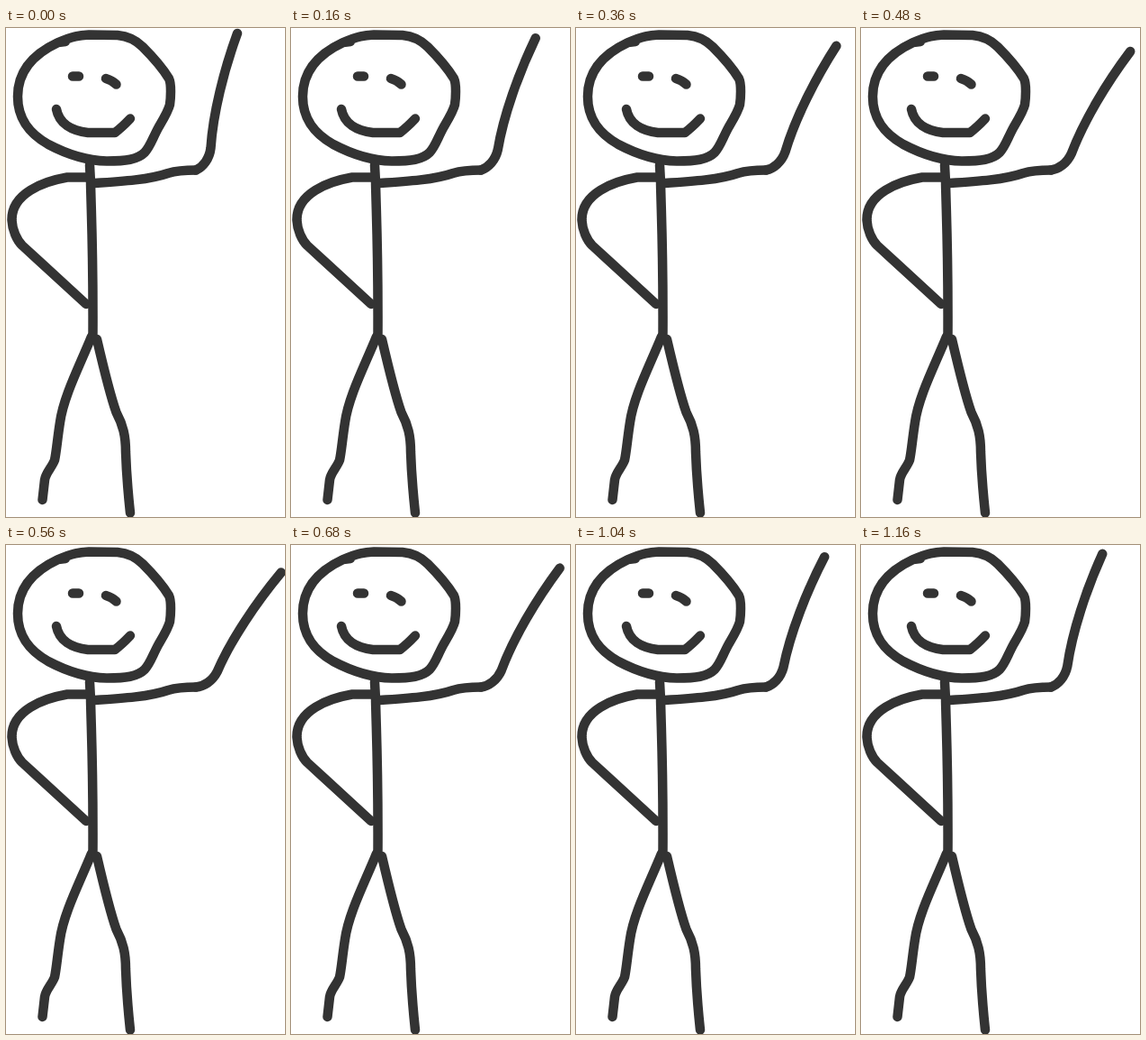
An HTML page that plays this animation: 310x542 px, repeating every 1.2 s.

```html
<!DOCTYPE html>
<html lang="en">
<head>
<meta charset="utf-8">
<title>Waving stick figure</title>
<style>
  html, body { margin: 0; width: 100%; height: 100%; overflow: hidden; background: #fff; }
  svg { display: block; width: 100%; height: 100%; }
  path { fill: none; stroke: #333; stroke-width: 10.5; stroke-linecap: round; stroke-linejoin: round; }
</style>
</head>
<body>
<svg viewBox="0 0 310 542">
  <!-- head and face -->
  <path d="M66 15L58 16C74 9 82 8 92 7.500L124 8C136 9 144 13 152 21C162 31 175 46 181 56C184 62 183 78 182 85C180 93 173 104 169 111C163 122 160 132 154 138C146 146 133 147.500 112 147.500C88 147 66 139 47 129C26 117 13 101 13 76C13 47 32 28 58 16"/>
  <path d="M74 53.500H81M111 56Q118 58 122.500 62.500"/>
  <path d="M56 90C59 106 73 114 91 116L121 116Q129 110 138 100.500"/>
  <!-- body and left arm -->
  <path d="M93 152L94 171C95 215 97 250 96.500 341"/>
  <path d="M92 165.500H68C42 170 6 183 6.500 213C7 224 12 235 18 241L89 306"/>
  <!-- legs -->
  <path d="M95 342C82 374 64 408 60 437C57 456 56 470 54 479C51 487 44 493 43 501L40.500 523"/>
  <path d="M101 345Q115 405 122.500 426C130 440 133 452 133 470Q134 500 138 537.500"/>
  <!-- right arm -->
  <path d="M98 172C130 170 160 168 180 161C190 158 200 157.500 211 157.500"/>
  <path id="forearm" d="M211 157.500C219 154 226 145 227.500 133C230 95 242 47 257 6"/>
</svg>
<script>
  const forearm = document.getElementById("forearm");
  const LOOP = 1200, STEP = 40, PEAK = 560;
  const TOP = 19.8, END = 4.3, LAST = LOOP - STEP;

  // Swing out steadily, come back more slowly, then snap to the start.
  const angleAt = t => t <= PEAK
    ? TOP * t / PEAK
    : TOP + (END - TOP) * (t - PEAK) / (LAST - PEAK);

  function draw(now) {
    const t = Math.floor(now % LOOP / STEP) * STEP;
    forearm.setAttribute("transform", `rotate(${angleAt(t)} 211 157.5)`);
    requestAnimationFrame(() => draw(performance.now()));
  }
  draw(performance.now());
</script>
</body>
</html>
```
